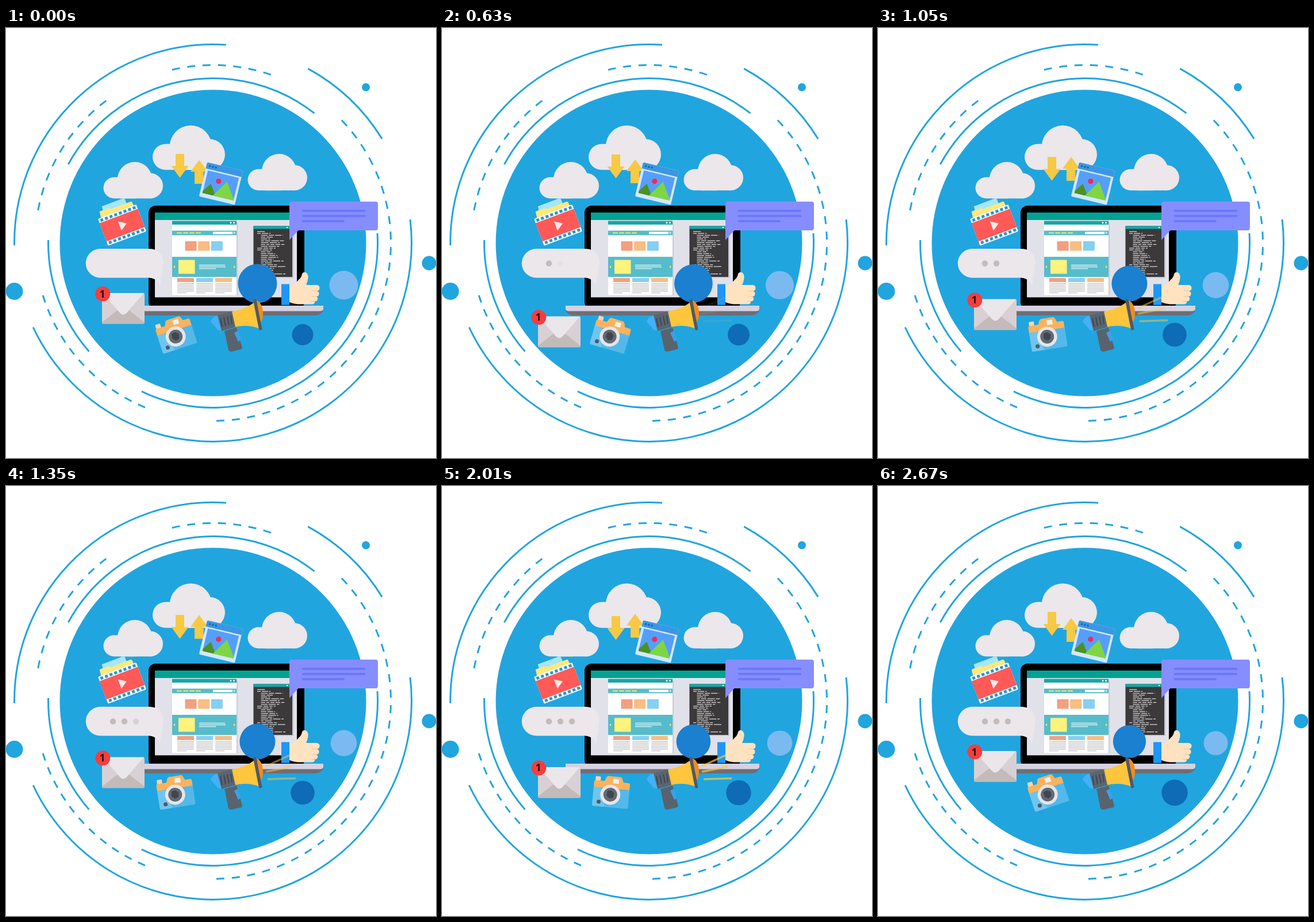
Animation of 748 by 748 pixels, one loop 2700 ms. Source, as an HTML page:

```html
<!DOCTYPE html>
<html lang="en">
<head>
<meta charset="utf-8">
<title>Digital marketing</title>
<style>
html, body { margin: 0; width: 100%; height: 100%; overflow: hidden; background: #fff; }
svg { display: block; width: 100vw; height: 100vh; }
</style>
</head>
<body>
<svg viewBox="0 0 748 748">
  <defs>
    <g id="cloud" fill="#ebe7eb">
      <rect y="26.500" width="74" height="37" rx="18.500"/>
      <circle cx="54.500" cy="30" r="30"/>
      <circle cx="81.500" cy="41.500" r="22"/>
      <rect x="30" y="35" width="51.500" height="28.500"/>
    </g>
  </defs>
  <g id="rings" fill="none" stroke="#21a5df" stroke-width="3"></g>
  <g fill="#21a5df">
    <circle cx="360" cy="374" r="266.500"/>
    <circle cx="14.500" cy="458" r="15"/>
    <circle cx="626" cy="103" r="7"/>
    <circle cx="736" cy="409" r="12.500"/>
  </g>

  <use href="#cloud" transform="translate(169.500 233)"/>
  <use href="#cloud" transform="translate(420.500 219)"/>
  <use href="#cloud" transform="translate(255 169.500) scale(1.217)"/>

  <g fill="#f7c944">
    <path id="down" d="M295 219H310V240H317.500L302.500 260.500L287.500 240H295Z"/>
    <path id="up" d="M328 271V250H321L336 229.500L351 250H343.500V271Z"/>
  </g>

  <!-- picture window -->
  <g transform="translate(350 233.500) rotate(13.500)">
    <rect width="64" height="61" rx="2" fill="#d4e7fb"/>
    <path d="M0 11V2Q0 0 2 0H62Q64 0 64 2V11Z" fill="#3b97e3"/>
    <g fill="#1d5fa8"><circle cx="6" cy="5.500" r="1.700"/><circle cx="11.500" cy="5.500" r="1.700"/><circle cx="17" cy="5.500" r="1.700"/></g>
    <rect x="4.500" y="13.500" width="55.500" height="40.500" fill="#559ffb"/>
    <path d="M4.500 54V50L15 35L28 54Z" fill="#4c921f"/>
    <path d="M23 54L41.500 25L60 52V54Z" fill="#7fd642"/>
    <circle cx="27" cy="27.500" r="4.600" fill="#f42a55"/>
  </g>

  <!-- film -->
  <g transform="translate(160 332) rotate(-20.700)">
    <path d="M14 -18H53Q56 -18 56 -15V0H12Z" fill="#a5e6f7"/>
    <path d="M7 -11H24L27 -8H63Q66 -8 66 -5V4H5Z" fill="#ffe87c"/>
    <rect width="71" height="50" rx="2" fill="#fff"/>
    <rect y="8" width="71" height="34" fill="#ff5a57"/>
    <path d="M3 4.200H70M3 45.800H70" stroke="#2496d3" stroke-width="5" stroke-dasharray="5 3.600"/>
    <path d="M31 16.500L44 25L31 33.500Z" fill="#f1e9ea"/>
  </g>

  <!-- laptop -->
  <rect x="248" y="309" width="271" height="180" rx="12"/>
  <rect x="259" y="321" width="247" height="147.500" fill="#e1e1ea"/>
  <rect x="259" y="321" width="247" height="13" fill="#00a294"/>
  <path d="M215 490H552Q550 500 536 500H231Q217 500 215 490Z" fill="#6d6e76"/>
  <path d="M215 483H552V489Q551 492.500 546 492.500H221Q216 492.500 215 489Z" fill="#d5d2e4"/>

  <g id="page">
    <rect x="401" y="338" width="2" height="127" fill="#ccc9d4"/>
    <rect x="289" y="335.500" width="112" height="129" fill="#fff"/>
    <rect x="289" y="335.500" width="112" height="6.500" fill="#17a7a5"/>
    <g fill="#fff"><circle cx="391" cy="338.700" r="1.500"/><circle cx="396.500" cy="338.700" r="1.500"/></g>
    <rect x="289" y="352.500" width="112" height="8" fill="#55bcca"/>
    <path d="M297 356.500H340" stroke="#f4ea6a" stroke-width="2" stroke-dasharray="9 2"/>
    <rect x="360" y="354.500" width="34" height="4" fill="#fff"/>
    <circle cx="397" cy="356.300" r="1.400" fill="none" stroke="#fff"/>
    <rect x="289" y="398" width="112" height="35" fill="#56bccb"/>
    <rect x="300" y="403.500" width="28.500" height="24" fill="#fff37c"/>
    <path d="M336 412.500H381M336 415.500H382M336 418.500H365" stroke="#d6f0f3" stroke-width="1.500"/>
    <path d="M294 413L291 415.500L294 418ZM396 413L399 415.500L396 418Z" fill="#f4ea6a"/>
  </g>
  <g id="code">
    <rect x="430.500" y="344.500" width="69.500" height="90" fill="#c4c1cb"/>
    <rect x="430.500" y="344.500" width="67.500" height="88.500" fill="#3b393a"/>
    <rect x="430.500" y="344.500" width="67.500" height="5" fill="#17a7a5"/>
    <g fill="#fff"><circle cx="489" cy="347" r="1.200"/><circle cx="494" cy="347" r="1.200"/></g>
  </g>

  <!-- typing bubble -->
  <path d="M164 384H249Q274 385 273.500 409L268 449Q265 436 249 434.500H164A25.200 25.200 0 0 1 164 384Z" fill="#ebe7eb"/>
  <g id="dots" fill="#c3bcbc">
    <circle cx="186" cy="409.500" r="5.200"/><circle cx="206" cy="409.500" r="5.200"/><circle cx="226" cy="409.500" r="5.200"/>
  </g>

  <g id="mail">
    <rect x="167" y="461" width="74" height="53.500" rx="2.500" fill="#d8d0d4"/>
    <path d="M167 512L204 483L241 512Q241 514.500 238.500 514.500H169.500Q167 514.500 167 512Z" fill="#c4bab9"/>
    <path d="M168 461H240L210 495.500Q204 501.500 198 495.500Z" fill="#eae6ea"/>
    <circle cx="168.300" cy="462.500" r="13" fill="#f73d3d"/>
    <text x="167.500" y="468.500" text-anchor="middle" font-family="'Open Sans', sans-serif" font-weight="700" font-size="17" fill="#15090a">1</text>
  </g>

  <g id="camera">
    <rect x="-28" y="-24" width="9" height="8" rx="1.500" fill="#fbd3b0"/>
    <path d="M-30 -2V-14Q-30 -17 -27 -17H-12L-9 -24Q-8 -26 -6 -26H15Q17 -26 18 -24L21 -17H30Q32.500 -17 32.500 -14V-2Z" fill="#fbb25c"/>
    <path d="M-30 -5H32.500V25.500Q32.500 28 30 28H-27.500Q-30 28 -30 25.500Z" fill="#54b9ea"/>
    <path d="M-30 -5H-17L-8 28H-27.500Q-30 28 -30 25.500Z" fill="#6fc5ee"/>
    <path d="M3 -22H13V-14H3Z" fill="#e8f1f5"/>
    <circle cy="6" r="17.500" fill="#e6e5e8"/>
    <circle cy="6" r="12" fill="#616a74"/>
    <path d="M-5.500 -.500L1.500 -1.500L6.500 3L5.500 10.500L-1 13L-6.500 8Z" fill="#40464d"/>
    <circle cx="-19" cy="20" r="3.500" fill="#4f5964"/>
  </g>

  <circle id="bigDisc" cx="437.400" cy="444.500" fill="#1b80d0"/>

  <!-- megaphone -->
  <path d="M380 527L401 521L411 556Q411 558 409 559L392 563Q388 563 387 560Z" fill="#59636e"/>
  <path d="M397 530L403 527Q408 535 408 543L404 546Z" fill="#3d9fe8"/>
  <path d="M356 511Q358 502 369 500L376 526Q368 528 365 521Z" fill="#44b0f8"/>
  <path d="M368 500L394 492.500L400 520L375 527Z" fill="#5b6570"/>
  <path d="M373 505L376 520M379 503L382 518.500M385 501.500L388 517M391 500L393 515" stroke="#3f4851" stroke-width="2"/>
  <path d="M436 474Q442 475 446 487Q449 501 444 511L439 511Z" fill="#f28c1c"/>
  <path d="M393 493Q417 489 432 477L441 523Q421 515 399 520Z" fill="#ffc53d"/>
  <path d="M433 474.500L442.500 523" stroke="#4f5a66" stroke-width="5.500" stroke-linecap="round"/>

  <!-- thumb -->
  <rect x="479" y="445.500" width="14" height="36.500" fill="#2196f3"/>
  <path d="M493 450Q502 447 509 438Q514 434 515 428Q517 424 521 425Q526 427 525.500 435Q525 441 522 447H541Q546 448 545.500 453Q545 457 541 457.500Q545 459 544.500 463Q544 467 540 467Q543 469 542 472.500Q541 475.500 537 475.500Q538 480 532 480.500H507Q500 480 493 477Z" fill="#ffe3c1"/>
  <path d="M532 457.500H541M532 467H540M530 475.500H537" stroke="#f3cfa6" stroke-width="1.300"/>

  <g id="rays" stroke="#fbc73f" stroke-width="3.500">
    <path d="M452 487.500L493 468.500M452 497L498 488M455 510L504 508.500"/>
  </g>

  <circle id="lightDisc" cx="587.500" cy="447.300" fill="#7abaf0"/>
  <circle id="darkDisc" cx="516" cy="533.500" fill="#0e6bb5"/>

  <path d="M497 302H643Q647 302 647 306V348Q647 352 643 352H508.500L493 369V306Q493 302 497 302Z" fill="#868eff"/>
  <path d="M516.500 318H623.500M516.500 327H623.500M516.500 336H587" stroke="#6b78fa" stroke-width="3.800" stroke-linecap="round"/>
</svg>
<script>
const $ = id => document.getElementById(id);

function add(parent, tag, attrs) {
  const el = document.createElementNS('http://www.w3.org/2000/svg', tag);
  for (const k in attrs) el.setAttribute(k, attrs[k]);
  parent.appendChild(el);
}

// Clockwise arc round the centre, through the directions of two points.
function arc(r, x0, y0, x1, y1, dashed) {
  const a = Math.atan2(y0 - 374, x0 - 360);
  let sweep = Math.atan2(y1 - 374, x1 - 360) - a;
  if (sweep < 0) sweep += 2 * Math.PI;
  const at = t => `${360 + r * Math.cos(t)} ${374 + r * Math.sin(t)}`;
  const attrs = { d: `M${at(a)}A${r} ${r} 0 ${sweep > Math.PI ? 1 : 0} 1 ${at(a + sweep)}` };
  if (dashed) {
    const len = r * sweep, share = 0.52;
    const p = len / (Math.round(len / 27 - share) + share);
    attrs['stroke-dasharray'] = `${p * share} ${p * (1 - share)}`;
  }
  add($('rings'), 'path', attrs);
}

arc(345.5, 14, 378, 383, 29.5);
arc(345.5, 525, 71, 654, 193);
arc(345.5, 703, 333, 46.5, 521);
arc(286.5, 108, 237, 536, 149);
arc(286.5, 144, 563, 73, 369);
arc(286.5, 646, 357, 236, 632);
arc(309.5, 289, 73, 461, 81, true);
arc(309.5, 584, 160, 366, 683, true);
arc(309.5, 242, 660, 64, 465, true);
arc(309.5, 55, 317, 174, 126, true);

const page = $('page');
['#f2a07f', '#f8bd82', '#86cff0'].forEach((fill, i) =>
  add(page, 'rect', { x: 311.5 + i * 22.7, y: 371, width: 20, height: 16.5, fill }));
['#f2a07f', '#86cff0', '#f8bd82'].forEach((fill, i) => {
  const x = 298 + i * 33;
  add(page, 'rect', { x, y: 435, width: 29, height: 7, fill });
  for (let j = 0; j < 7; j++)
    add(page, 'rect', { x, y: 444 + j * 2.7, width: j == 6 ? 16 : 29, height: 1.1, fill: '#b9b6bb' });
});

let seed = 7;
const rnd = () => (seed = seed * 16807 % 2147483647) / 2147483647;
for (let y = 353.5; y < 430; y += 3.2) {
  let x = 437 + (y > 357 && rnd() > 0.3 ? 6.5 : 0);
  const end = x + 14 + rnd() * 32;
  while (x < end) {
    const w = Math.min(4 + rnd() * 10, end - x);
    add($('code'), 'rect', { x, y, width: w, height: 1.3, fill: '#d4d2d3' });
    x += w + 1.8;
  }
}

const FRAMES = 90, STEP = 30;
const clamp = v => Math.max(0, Math.min(1, v));
// Linear there-and-back wave, 0 to 1 to 0.
const wave = (f, half) => 1 - Math.abs((f / half) % 2 - 1);

function draw(f) {
  const pulse = wave(f, 10);
  const nod = f < 80 ? pulse : 0;
  const swing = f < 80 ? wave(f, 20) : 0;

  $('down').setAttribute('transform', `translate(0 ${10.5 * nod})`);
  $('up').setAttribute('transform', `translate(0 ${-10.5 * nod})`);
  $('rays').setAttribute('opacity', nod);
  $('mail').setAttribute('transform', `translate(0 ${43 * swing})`);
  $('camera').setAttribute('transform', `translate(293.300 531) rotate(${-18 + 36 * swing})`);
  $('bigDisc').setAttribute('r', 34 - 6 * pulse);
  $('lightDisc').setAttribute('r', 25 - 4.5 * pulse);
  $('darkDisc').setAttribute('r', 18.5 + 4.7 * pulse);
  [...$('dots').children].forEach((dot, i) =>
    dot.setAttribute('opacity', clamp((f - 20 * i) / 10)));
}

const start = performance.now();
function tick() {
  draw(Math.floor((performance.now() - start) / STEP) % FRAMES);
  requestAnimationFrame(tick);
}
tick();
</script>
</body>
</html>
```
